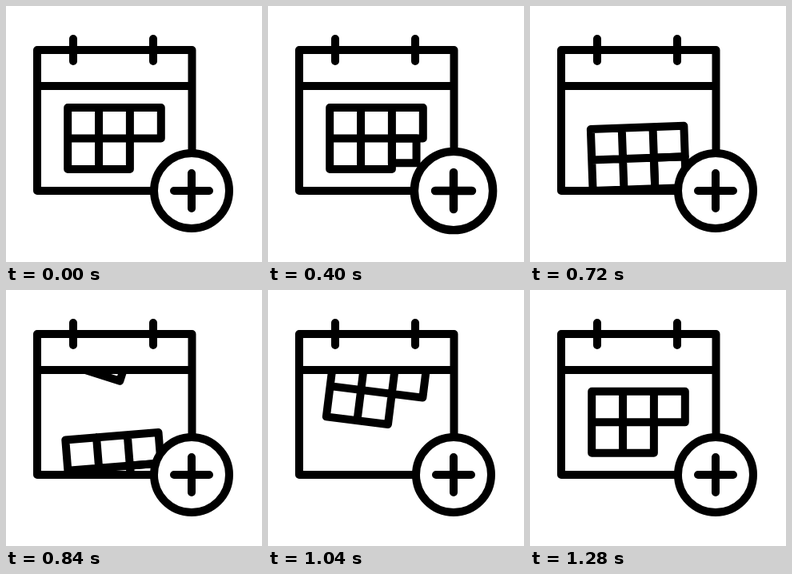
Write an HTML page that moves like this. It is 320x320 px and loops after 1.48 s.

```html
<!DOCTYPE html>
<html lang="en">
<head>
<meta charset="utf-8">
<title>Add calendar day</title>
<style>
  html, body { margin: 0; height: 100%; overflow: hidden; background: #fff; }
  svg { display: block; width: 100vw; height: 100vh; }
</style>
</head>
<body>
<svg viewBox="0 0 320 320" fill="none" stroke="#000" stroke-width="10" stroke-linecap="round" stroke-linejoin="round">
  <defs>
    <clipPath id="page"><path d="M39 100H232.5V231H39Z"/></clipPath>
    <!-- Five cells, centred on the grid's middle -->
    <path id="cells" d="M-58.3 -38.5H58.3V0H-58.3ZM-58.3 0V38.5H19.4V-38.5M-19.4 -38.5V38.5"/>
  </defs>
  <g clip-path="url(#page)">
    <g id="leaving">
      <use href="#cells"/>
      <rect id="newCell" x="19.4"/>
    </g>
    <use id="arriving" href="#cells"/>
  </g>
  <path d="M39 55H232.5V231H39ZM39 100H232.5M84 41V69M184 41V69"/>
  <g id="button">
    <circle r="47" fill="#fff"/>
    <path d="M-22 0H22M0 -22V22"/>
  </g>
</svg>
<script>
  const LOOP = 1480, DROP = 150, CELL = 38.7;
  const [leaving, arriving, newCell, button] =
    ['leaving', 'arriving', 'newCell', 'button'].map(id => document.getElementById(id));

  const ease = (t, from, to) => {
    const p = Math.min(1, Math.max(0, (t - from) / (to - from)));
    return p * p * (3 - 2 * p);
  };

  const place = (grid, offset, tilt) =>
    grid.setAttribute('transform', `translate(135.5 ${165.5 + offset}) rotate(${offset * tilt})`);

  function draw(now) {
    const t = now % LOOP;

    const pulse = ease(t, 110, 315) - ease(t, 315, 520);
    button.setAttribute('transform', `translate(232 231) scale(${1 + 0.073 * pulse})`);

    const size = CELL * ease(t, 115, 520);
    newCell.setAttribute('width', size);
    newCell.setAttribute('height', size);
    newCell.setAttribute('visibility', size ? 'visible' : 'hidden');

    const fall = DROP * ease(t, 520, 1297);
    place(leaving, fall, -0.083);
    place(arriving, fall - DROP, -0.187);

    requestAnimationFrame(draw);
  }
  draw(performance.now());
</script>
</body>
</html>
```
